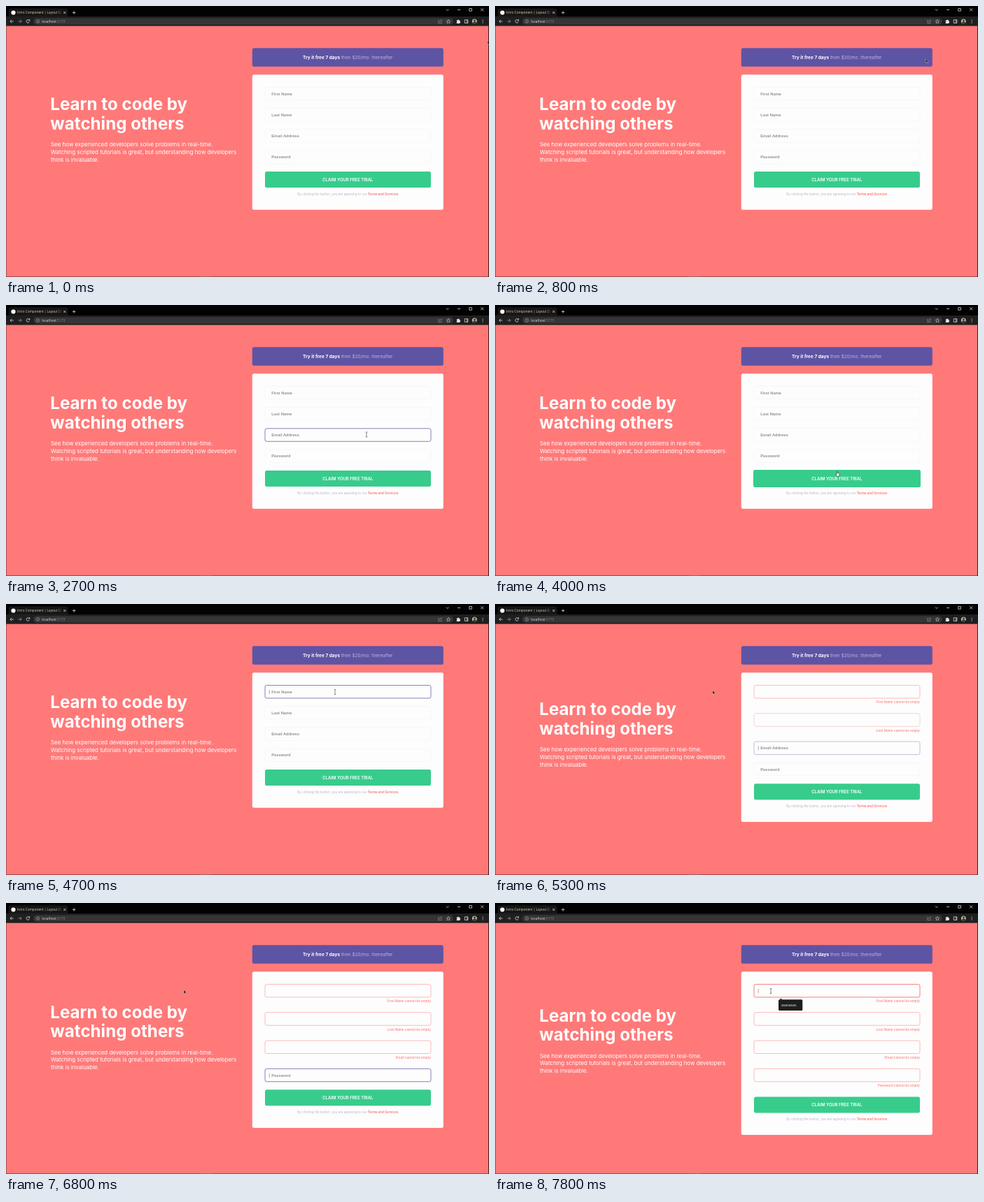
These frames come from a looping animation (690x388 px, 8 s). An HTML page:

```html
<!DOCTYPE html>
<html lang="en">
<head>
<meta charset="utf-8">
<title>Intro Component</title>
<style>
  html, body { margin: 0; width: 100%; height: 100%; overflow: hidden; background: #ff7979; }
  svg { display: block; width: 690px; height: 388px; font-family: Inter, "Open Sans", sans-serif; }
  .ui { font-family: "Open Sans", "Noto Sans", sans-serif; }
  .hint { font: bold 5.78px "Liberation Sans", Arial, sans-serif; fill: #929292; }
  .err { font-size: 4.6px; font-style: italic; font-weight: 500; fill: #ff7d7d; text-anchor: end; }
  .line { fill: none; stroke: #d8d8d8; stroke-width: .8; }
</style>
</head>
<body>
<svg viewBox="0 0 690 388">
  <rect width="690" height="388" fill="#ff7979"/>

  <!-- browser frame -->
  <rect width="690" height="15.5" fill="#020202"/>
  <path d="M1 15.5Q4 15.5 4 12.500V6Q4 3.500 6.500 3.500H86Q88.500 3.500 88.500 6V12.500Q88.500 15.500 91.500 15.500Z" fill="#161616"/>
  <rect y="15" width="690" height="13.6" fill="#1f1f1f"/>
  <rect x="39" y="17.300" width="600" height="9.400" rx="4.700" fill="#353535"/>
  <circle cx="10.500" cy="9.500" r="3.100" fill="#fff"/>
  <defs>
    <linearGradient id="fade" gradientUnits="userSpaceOnUse" x1="73" x2="79" y1="0" y2="0">
      <stop stop-color="#d9d3b4"/><stop offset="1" stop-color="#d9d3b4" stop-opacity="0.2"/>
    </linearGradient>
    <clipPath id="tab"><rect x="15" y="4" width="64" height="11"/></clipPath>
    <clipPath id="face"><circle cx="669.300" cy="22" r="3.500"/></clipPath>
  </defs>
  <g class="ui">
    <text x="16" y="11.200" font-size="4.700" fill="url(#fade)" clip-path="url(#tab)">Intro Component | Layout Drills</text>
    <text x="51.300" y="23.900" font-size="4.900" fill="#e2e2e2">localhost<tspan fill="#8a8a8a">:5173</tspan></text>
  </g>
  <g class="line">
    <path d="M82.300 8l3 3m0-3l-3 3M95 9.500h4.400M97.200 7.300v4.400"/>
    <path d="M629 4.700l1.800 1.800 1.800-1.800M645.200 5.500h4M661.800 3.600h3.600v3.600h-3.600ZM678.200 3.400l4 4m0-4l-4 4"/>
    <path d="M10.800 22H6m2.200-2.300L5.900 22l2.300 2.300"/>
    <path d="M17.400 22h4.800m-2.200-2.300l2.300 2.300-2.300 2.300" stroke="#999"/>
    <path d="M33.300 20.700a2.300 2.300 0 1 0 .2 2M33.700 19v2h-2"/>
    <path d="M45.500 21.600v1.800m0-3v.5" stroke="#aaa" stroke-width=".6"/>
    <circle cx="45.500" cy="22" r="2.300" stroke="#aaa" stroke-width=".6"/>
    <path d="M619 20.500h-1.200v4h4.400v-1.700M619.300 23q.3-2.300 3-2.300m-1-1.200l1.300 1.200-1.300 1.200" stroke="#999" stroke-width=".6"/>
    <path d="M632 19.300l.8 1.900 2 .2-1.500 1.300.5 2-1.800-1.100-1.800 1.100.5-2-1.500-1.300 2-.2Z" stroke="#ccc" stroke-width=".6"/>
    <path d="M655.300 19.800h4.600v4.600h-4.600ZM658.700 20v4.200"/>
  </g>
  <path d="M643.700 20.500h1.500a.9.900 0 0 1 1.800 0h1.400v1.400a.9.900 0 0 1 0 1.800v1.300h-4.700v-1.500a.8.800 0 0 0 0-1.600Z" fill="#e4e4e4"/>
  <g clip-path="url(#face)">
    <rect x="665" y="18" width="9" height="8" fill="#b9b39c"/>
    <circle cx="669.500" cy="21" r="1.400" fill="#3d352c"/>
    <ellipse cx="669.500" cy="25.300" rx="2.800" ry="2.800" fill="#3d352c"/>
  </g>
  <path d="M680.600 19.500h1v1h-1zm0 2h1v1h-1zm0 2h1v1h-1z" fill="#e4e4e4"/>
  <path d="M0 28.600h.4V387.400H689V28.600H690V388H0Z" fill="#3b1d1f"/>
  <path d="M278 387.700h16" stroke="#8a8080" stroke-width=".6"/>

  <g id="copy" fill="#fff">
    <g font-size="24.150" font-weight="700">
      <text x="63.300" y="149.400">Learn to code by</text>
      <text x="63.300" y="177.300">watching others</text>
    </g>
    <g font-size="7.940">
      <text x="64" y="201.400">See how experienced developers solve problems in real-time.</text>
      <text x="64" y="211.900">Watching scripted tutorials is great, but understanding how developers</text>
      <text x="64" y="222.500">think is invaluable.</text>
    </g>
  </g>

  <rect x="351.800" y="60.300" width="273" height="26.500" rx="2.500" fill="#5e54a4"/>
  <text x="488.300" y="75.700" font-size="6.530" text-anchor="middle" fill="#bcb5dc"><tspan font-weight="700" fill="#fff">Try it free 7 days</tspan> then $20/mo. thereafter</text>

  <rect id="card" x="351.800" y="98.300" width="273" rx="2.500" fill="#fdfdfd"/>
  <g id="fields"></g>

  <g id="foot">
    <rect id="btn" rx="2.500" fill="#38cc8c"/>
    <text x="488.300" y="250.700" font-size="5.950" font-weight="600" text-anchor="middle" fill="#fff">CLAIM YOUR FREE TRIAL</text>
    <text x="488.300" y="270.900" font-size="4.560" text-anchor="middle" fill="#b7b3cc">By clicking the button, you are agreeing to our <tspan font-weight="600" fill="#ff6f6f">Terms and Services</tspan></text>
  </g>

  <g id="tip">
    <path d="M406.500 138.600l2-2.200 2 2.200Z" fill="#1e1e1e"/>
    <rect x="405" y="138.300" width="34.300" height="15.700" rx="1.500" fill="#1e1e1e"/>
    <text class="ui" x="409" y="148" font-size="5.200" fill="#eee">asasasas</text>
  </g>

  <g id="pointer">
    <path d="M0 0V5.400L1.300 4.300 2.200 6.300 3.100 5.900 2.200 4H3.900Z" fill="#111" stroke="#fff" stroke-width=".35"/>
    <path d="M-1.400-3.700Q0-3.700 0-2.900Q0-3.700 1.400-3.700M0-2.900V2.900M-1.400 3.700Q0 3.700 0 2.900Q0 3.700 1.400 3.700" fill="none" stroke="#444" stroke-width=".65"/>
    <path d="M-.7-1.300Q0-2 .6-1.300V1Q2.700 1 3 2V4.200L2.300 5.700H-.9L-2.400 3.100Q-2.200 2.100-.7 3Z" fill="#fff" stroke="#222" stroke-width=".6"/>
  </g>
</svg>
<script>
const LOOP = 8000, GAP = 30.2, DROP = 10.1;
const $ = id => document.getElementById(id);
const set = (el, attrs) => { for (const k in attrs) el.setAttribute(k, attrs[k]); };
const show = (el, on) => el.setAttribute('visibility', on ? 'visible' : 'hidden');
const make = (tag, parent, attrs, text = '') => {
  const el = document.createElementNS('http://www.w3.org/2000/svg', tag);
  set(el, attrs);
  el.textContent = text;
  parent.appendChild(el);
  return el;
};

// pointer stops: time, x, y
const stops = [
  [100, 688, 49.5], [900, 612, 77], [1500, 542, 122.5], [1800, 541, 124], [2600, 515, 185.5],
  [2800, 515, 185.5], [3600, 490, 242], [3800, 489, 239.5], [4050, 489, 239.5],
  [4500, 470, 126], [5000, 470, 126], [5220, 311, 123.7], [5350, 311, 123.7],
  [6100, 254, 124.4], [6800, 254, 124.4], [7350, 394, 126]
];
const errorAt = [5050, 5200, 5950, 6900];
// focus spans: field, from, to
const focusSpans = [[0, 4450, 5050], [1, 5050, 5200], [2, 5200, 5950], [3, 5950, 6900], [0, 7400, LOOP]];

const rowY = (i, n) => 125.6 + GAP * i + DROP * Math.min(n, i);
const errors = t => errorAt.filter(e => t >= e).length;
const focused = (i, t) => focusSpans.some(([f, a, b]) => f === i && t >= a && t < b);

function pointerAt(t) {
  const k = stops.findIndex(s => s[0] > t);
  if (k === 0) return stops[0].slice(1);
  if (k < 0) return stops[stops.length - 1].slice(1);
  const [t0, x0, y0] = stops[k - 1], [t1, x1, y1] = stops[k];
  const p = (t - t0) / (t1 - t0), e = p * p * (3 - 2 * p);
  return [x0 + (x1 - x0) * e, y0 + (y1 - y0) * e];
}
const over = ([x, y], mid, half) => x > 370 && x < 607 && Math.abs(y - mid) < half;
const hovered = (i, t) => over(pointerAt(t), rowY(i, errors(t)), 9.5);
const onButton = t => over(pointerAt(t), 248.6 + DROP * errors(t), 11.5);

// share of the last 160 ms in which a state held, squared for a soft transition
function ease(state, t) {
  let sum = 0;
  for (let k = 0; k < 16; k++) sum += state(Math.max(0, t - k * 10)) ? 1 : 0;
  return (sum / 16) ** 2;
}
const mix = (a, b, p) => a.map((v, i) => v + (b[i] - v) * p);
const rgb = c => `rgb(${c.map(Math.round)})`;
const IDLE = [246, 246, 246], BLUE = [122, 114, 178], PINK = [255, 178, 178], RED = [248, 112, 112];

const fields = ['First Name', 'Last Name', 'Email Address', 'Password'].map(name => {
  const g = make('g', $('fields'), {});
  return {
    g,
    box: make('rect', g, { x: 370, y: -9.2, width: 237, height: 18.5, rx: 2.5, fill: '#fdfdfd', 'stroke-width': .9 }),
    hint: make('text', g, { class: 'hint', x: 379.2, y: 2.1 }, name),
    err: make('text', g, { class: 'err', x: 607, y: 16.8 }, name.replace(' Address', '') + ' cannot be empty'),
    caret: make('path', g, { d: 'M376.2-2.800v6.200', stroke: '#777', 'stroke-width': .6 })
  };
});

function draw(t) {
  const n = errors(t), shift = DROP * n;
  set($('copy'), { transform: `translate(0 ${shift / 2})` });
  set($('foot'), { transform: `translate(0 ${shift})` });
  set($('card'), { height: 193.4 + shift });

  fields.forEach((f, i) => {
    const bad = i < n;
    const active = ease(u => focused(i, u) || hovered(i, u), t);
    const base = mix(IDLE, PINK, ease(u => u >= errorAt[i], t));
    set(f.g, { transform: `translate(0 ${rowY(i, n)})` });
    set(f.box, { stroke: rgb(mix(base, bad ? RED : BLUE, active)) });
    show(f.hint, !bad);
    show(f.err, bad);
    show(f.caret, focused(i, t));
  });

  const grow = ease(onButton, t);
  set($('btn'), { x: 370 - grow, y: 237 - grow, width: 237 + 2 * grow, height: 23 + 2 * grow });
  show($('tip'), t >= 7450);

  const p = pointerAt(t);
  const kind = onButton(t) ? 2 : fields.some((f, i) => hovered(i, t)) ? 1 : 0;
  set($('pointer'), { transform: `translate(${p[0]} ${p[1]})` });
  [...$('pointer').children].forEach((el, i) => show(el, i === kind));
}

const start = performance.now();
function tick() {
  draw((performance.now() - start) % LOOP);
  requestAnimationFrame(tick);
}
tick();
</script>
</body>
</html>
```
